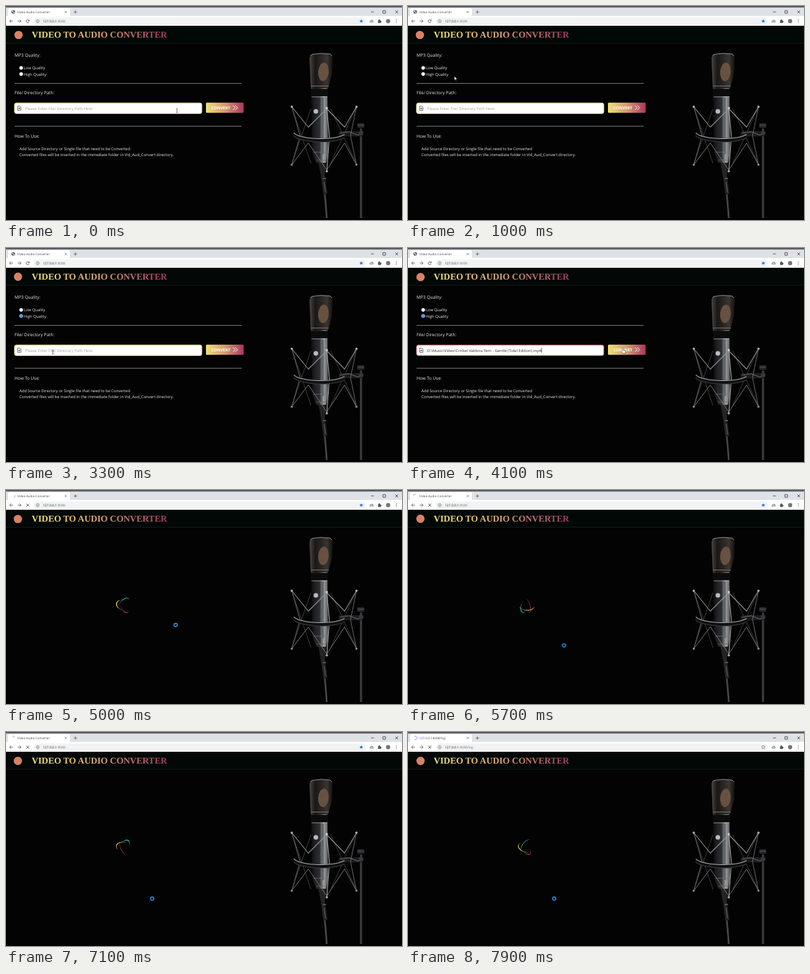
Write an HTML page with a canvas that moves like this. It is 600 px wide and 325 px high and loops after 8 s.

```html
<!DOCTYPE html>
<html lang="en">
<head>
<meta charset="utf-8">
<title>Video-Audio-Converter</title>
<style>
html, body { margin: 0; width: 100%; height: 100%; overflow: hidden; background: #030303; }
canvas { display: block; width: 600px; height: 325px; }
</style>
</head>
<body>
<canvas id="stage"></canvas>
<script>
const W = 600, H = 325, LOOP = 8000;
const LOW_AT = 1500, HIGH_AT = 2500, FOCUS_AT = 3450, PASTE_AT = 3700, SUBMIT_AT = 4450, LOG_AT = 7600;
const SANS = '"Open Sans", "Noto Sans", sans-serif';
const PATH = 'D:\\Music\\Video\\Crickel Valdora Tern - Gentle (Tidal Edition).mp4';

const canvas = document.getElementById('stage');
const dpr = window.devicePixelRatio || 1;
canvas.width = W * dpr;
canvas.height = H * dpr;
const c = canvas.getContext('2d');

// Pointer stops: time, x, y
const route = [
  [0, 259, 159], [250, 259, 159], [1300, 24, 94], [1550, 24, 94], [1900, 54, 117],
  [2350, 24, 103], [2600, 24, 103], [3250, 71, 158], [3650, 72, 158], [4050, 326, 155],
  [4500, 326, 155], [5000, 257, 205], [5400, 240, 231], [6300, 226.5, 250.5],
  [6400, 226, 251], [7000, 221.5, 253], [8000, 221.5, 253]
];

function pointer(t) {
  let i = 1;
  while (route[i][0] < t) i++;
  const [t0, x0, y0] = route[i - 1], [t1, x1, y1] = route[i];
  const u = (t - t0) / (t1 - t0), e = u * u * (3 - 2 * u);
  return [x0 + (x1 - x0) * e, y0 + (y1 - y0) * e];
}

function rect(x, y, w, h, fill) {
  c.fillStyle = fill;
  c.fillRect(x, y, w, h);
}

function round(x, y, w, h, r, fill, stroke, lw = 1) {
  c.beginPath();
  c.roundRect(x, y, w, h, r);
  if (fill) { c.fillStyle = fill; c.fill(); }
  if (stroke) { c.strokeStyle = stroke; c.lineWidth = lw; c.stroke(); }
}

function trace(pts, close) {
  c.beginPath();
  for (let i = 0; i < pts.length; i += 2) c.lineTo(pts[i], pts[i + 1]);
  if (close) c.closePath();
}

function line(color, lw, ...pts) {
  trace(pts);
  c.strokeStyle = color;
  c.lineWidth = lw;
  c.stroke();
}

function poly(fill, ...pts) {
  trace(pts, true);
  c.fillStyle = fill;
  c.fill();
}

function disc(x, y, r, fill) {
  c.beginPath();
  c.arc(x, y, r, 0, 7);
  c.fillStyle = fill;
  c.fill();
}

function arc(x, y, r, a, b, color, lw) {
  c.beginPath();
  c.arc(x, y, r, a, b);
  c.strokeStyle = color;
  c.lineWidth = lw;
  c.stroke();
}

function text(str, x, y, size, fill, weight = 400, family = SANS) {
  c.font = `${weight} ${size}px ${family}`;
  c.fillStyle = fill;
  c.fillText(str, x, y);
  return x + c.measureText(str).width;
}

function blend(x0, x1, ...colors) {
  const g = c.createLinearGradient(x0, 0, x1, 0);
  colors.forEach((k, i) => g.addColorStop(i / (colors.length - 1), k));
  return g;
}

function star(x, y, r, filled) {
  const pts = [];
  for (let i = 0; i < 10; i++) {
    const a = i * Math.PI / 5 - Math.PI / 2, q = i % 2 ? r * 0.45 : r;
    pts.push(x + q * Math.cos(a), y + q * Math.sin(a));
  }
  trace(pts, true);
  if (filled) { c.fillStyle = '#1a73e8'; c.fill(); }
  else { c.strokeStyle = '#5f6368'; c.lineWidth = 0.6; c.stroke(); }
}

function cross(x, y, r, color, lw) {
  line(color, lw, x - r, y - r, x + r, y + r);
  line(color, lw, x - r, y + r, x + r, y - r);
}

function arrow(x, y, dir, color) {
  line(color, 0.8, x - 2.6 * dir, y, x + 2.6 * dir, y);
  line(color, 0.8, x, y - 2.5, x + 2.6 * dir, y, x, y + 2.5);
}

function browser(t) {
  const loading = t >= SUBMIT_AT, log = t >= LOG_AT;
  rect(0, 0, W, 15, '#dee1e6');
  rect(0, 0, W, 2.3, '#575a60');
  round(3, 3, 94, 14, [3, 3, 0, 0], '#fff');
  rect(0, 15, W, 15, '#fff');

  if (loading) {
    const a = log ? t / 130 : -t / 260;
    arc(11, 9, 2.6, a, a + (log ? 4 : 1.7), log ? '#3f86e8' : '#8a9096', 0.8);
  } else {
    disc(11, 9, 2.8, '#5f6368');
    poly('#dfe1e4', 9, 8, 10.5, 7, 11.4, 8.2, 10.2, 9.6);
    poly('#dfe1e4', 11.4, 9.2, 13, 9, 12.4, 10.6, 11, 11.2);
  }
  text(log ? '127.0.0.1:8088/log' : 'Video-Audio-Converter', 17, 10.8, 4.65, '#45494d');
  cross(90.5, 9.2, 1.5, '#50555a', 0.7);
  line('#50555a', 0.8, 102.8, 9.2, 107.6, 9.2);
  line('#50555a', 0.8, 105.2, 6.8, 105.2, 11.6);
  line('#222', 0.7, 553, 9, 557.5, 9);
  round(571, 7, 4, 4, 0, null, '#222', 0.7);
  cross(592, 9, 2.1, '#222', 0.7);

  arrow(8, 23, -1, '#50555a');
  arrow(20.3, 23, 1, '#50555a');
  if (loading) cross(33, 23, 2.2, '#50555a', 0.9);
  else {
    arc(33, 23, 2.3, 0.5, 5.6, '#50555a', 0.9);
    poly('#50555a', 35.7, 20.2, 35.7, 22.8, 33.2, 22.8);
  }
  round(42, 17.6, 503, 11, 5.5, '#f1f3f4');
  arc(48, 23, 2.3, 0, 7, '#5f6368', 0.6);
  rect(47.7, 22.6, 0.7, 1.8, '#5f6368');
  rect(47.7, 21.5, 0.7, 0.7, '#5f6368');
  const x = text('127.0.0.1', 56, 24.9, 5, '#24272a');
  text(log ? ':8088/log' : ':8088', x, 24.9, 5, '#777c81');
  star(538.3, 23, 3, !log);

  arc(554, 24, 2.5, 3, 6.4, '#50555a', 0.8);
  line('#50555a', 0.8, 553.5, 24.2, 555.4, 22);
  line('#50555a', 0.6, 551.4, 24.5, 556.6, 24.5);
  round(563.7, 21.6, 4.2, 4.2, 0.5, '#50555a');
  disc(565.6, 21.3, 1, '#50555a');
  disc(568, 23.7, 1, '#50555a');
  disc(579, 23, 3.2, '#777');
  for (const y of [20.9, 23, 25.1]) disc(591.3, y, 0.6, '#50555a');
}

function header(t) {
  rect(0, 30, W, 26, '#020806');
  rect(0, 56, W, 0.8, '#171c20');
  const a = t * Math.PI / 1000;
  disc(18.5 + 0.5 * Math.cos(a), 44 + 0.5 * Math.sin(a), 6.3, '#d98165');
  text('VIDEO TO AUDIO CONVERTER', 39, 48.2, 13.62, blend(39, 245, '#f3e97c', '#d9a077', '#9c3b60'),
    700, '"Liberation Serif", "Times New Roman", serif');
}

function microphone() {
  // stand
  rect(535.8, 186, 4.2, 136, blend(535.8, 540, '#121212', '#4c4c4c', '#111'));
  round(532, 178, 11, 7, 2, '#25282c');
  line('#555a5f', 1, 533, 181, 542, 181);
  round(504, 190, 36, 8, 3, '#1c1c1e');
  line('#77797c', 0.9, 506, 193, 520, 191, 533, 196, 541, 193);
  disc(538, 193, 3.5, '#36383b');

  // rear struts
  for (const [x0, x1] of [[433, 462], [531, 492]]) {
    line('#3c3c3c', 1, x0, 153, x1, 239);
    line('#3c3c3c', 1, x0, 240, x1, 156);
  }

  // cable
  c.beginPath();
  c.moveTo(478, 234);
  c.bezierCurveTo(478, 255, 483, 275, 486, 322);
  c.strokeStyle = '#303030';
  c.lineWidth = 3;
  c.stroke();
  line('#717171', 0.7, 478, 250, 483, 282, 486, 322);
  poly('#242424', 473, 236, 485, 236, 483, 257, 487, 285, 481, 287, 477, 257);
  line('#8a8a8a', 1, 480, 262, 485, 262);
  line('#777', 0.8, 482, 267, 484, 283);

  // body
  poly(blend(462, 488, '#0b0b0c', '#202124', '#2b2d30', '#9da0a3', '#555'),
    462, 125, 487, 125, 488, 222, 485, 238, 470, 238, 464, 222);
  rect(462, 126, 26, 11, '#0c0c0d');
  line('#a7a7a7', 0.8, 463, 138, 487, 138);
  rect(477, 139, 4.5, 86, '#606367');
  disc(469.5, 160, 3.5, '#b9bbbd');
  line('#757575', 0.8, 466, 222, 487, 222);
  line('#666', 0.8, 470, 234, 485, 234);

  // head
  c.save();
  trace([460, 78, 463, 73, 477, 71.5, 492, 72.5, 495, 77, 494, 102, 488, 125, 462, 126], true);
  c.clip();
  rect(458, 70, 40, 58, blend(460, 495, '#55514e', '#201d1b', '#352e2a', '#45413e', '#171513'));
  c.beginPath();
  c.ellipse(481, 100, 8, 14, 0.08, 0, 7);
  c.fillStyle = '#806450';
  c.fill();
  for (let i = -60; i < 45; i += 2.2) {
    line('rgba(0,0,0,.38)', 0.6, 458 + i, 70, 516 + i, 128);
    line('rgba(0,0,0,.38)', 0.6, 500 - i, 70, 442 - i, 128);
  }
  rect(459, 121, 34, 1, '#77716c');
  c.restore();
  line('#9b9793', 0.9, 461, 76, 464, 73.5, 477, 72, 491, 73, 494, 76);
  line('#54504d', 0.7, 460.5, 78, 462.5, 125);

  // suspension frame
  for (const [x0, x1, x2] of [[433, 458, 486], [531, 513, 486]]) {
    line('#929292', 1.1, x0, 153, x1, 184, x2, 156);
    line('#777', 1, x0, 241, x1, 208, x2, 249);
    line('#6a6a6a', 1, x0, 153, (x0 + x1) / 2, 197, x0, 241);
    disc(x0, 153, 1.7, '#bbb');
    disc(x0, 241, 1.6, '#999');
  }
  line('#a2a2a2', 1.2, 486, 156, 490, 198, 486, 251);
  disc(486, 155, 1.8, '#ccc');
  disc(486, 251, 1.8, '#aaa');

  // ring
  for (const [color, lw, dy] of [['#101011', 6, 0], ['#aeb0b2', 1.1, -2.4], ['#4a4b4d', 0.8, 2.6]]) {
    c.beginPath();
    c.moveTo(436, 195 + dy);
    c.bezierCurveTo(445, 204 + dy, 490, 208 + dy, 513, 198 + dy);
    c.strokeStyle = color;
    c.lineWidth = lw;
    c.stroke();
  }
}

function radio(y, on) {
  disc(23, y, 2.7, '#fff');
  if (!on) return;
  arc(23, y, 2.4, 0, 7, '#1673df', 0.8);
  disc(23, y, 1.45, '#1673df');
}

function form(t) {
  const ink = '#ececec';
  text('MP3 Quality:', 13, 76.9, 6.6, ink);
  radio(94, t >= LOW_AT && t < HIGH_AT);
  radio(103.2, t >= HIGH_AT);
  text('Low Quality', 27, 96.2, 5.93, ink);
  text('High Quality', 27, 105.5, 5.93, ink);
  rect(13, 117, 344, 0.9, '#858585');
  text('File/ Directory Path:', 13, 134.4, 6.6, ink);

  const focused = t >= FOCUS_AT;
  round(12.8, 147.2, 284, 16.2, 3, '#fff', focused ? '#b8434b' : '#e2d568', 0.9);
  line('#333', 0.7, 17.7, 152, 20.8, 152, 22.7, 154, 22.7, 158.4, 17.7, 158.4, 17.7, 152);
  line('#333', 0.7, 18.8, 155.6, 21.6, 155.6);
  line('#333', 0.7, 20.2, 154.2, 20.2, 157);
  if (t >= PASTE_AT) {
    const end = text(PATH, 29, 157.7, 5.87, '#333');
    rect(end + 0.3, 151.6, 0.6, 7.4, '#111');
  } else {
    text('Please Enter File/ Directory Path Here', 29, 157.7, 5.87, '#a0a0a0');
    if (focused) rect(28.6, 151.6, 0.6, 7.4, '#111');
  }

  round(303, 146.8, 57, 15.4, 1.5, blend(303, 360, '#eee076', '#d69a70', '#a9375f'));
  text('CONVERT', 311, 156.8, 6.2, '#fff', 700);
  for (const x of [344, 347.6]) line('#fff', 1, x, 151.2, x + 3.3, 154.5, x, 157.8);

  rect(13, 182.2, 344, 0.9, '#858585');
  text('How To Use:', 13, 199.9, 6.6, ink);
  text('Add Source Directory or Single file that need to be Converted', 20.3, 219.1, 5.93, ink);
  text('Converted files will be inserted in the immediate folder in Vid_Aud_Convert directory.',
    20.3, 228.4, 5.93, ink);
}

// Three tilted crescents spinning once per second
function loader(t) {
  const turn = Math.PI + t * Math.PI / 500, r = 12.5, deg = Math.PI / 180;
  const rings = [[35, -45, 0, '#36b3bd'], [50, 10, -90, '#e6cf5c'], [35, 55, 180, '#bf3550']];
  for (const [ax, ay, start, color] of rings) {
    const a = ax * deg, b = ay * deg;
    c.save();
    c.translate(179, 175);
    c.transform(Math.cos(b), Math.sin(a) * Math.sin(b), 0, Math.cos(a), 0, 0);
    c.rotate(turn + start * deg);
    c.beginPath();
    c.arc(0, 0, r, 0, Math.PI);
    c.ellipse(0, 0, r, r - 1.4, 0, Math.PI, 0, true);
    c.fillStyle = color;
    c.fill();
    c.restore();
  }
}

function cursor(t) {
  const [x, y] = pointer(t);
  if (t >= SUBMIT_AT) {
    arc(x, y, 2.5, 0, 7, '#2f9bf0', 1.3);
    return;
  }
  const inRow = y > 147 && y < 163;
  c.save();
  c.translate(x, y);
  if (inRow && x > 13 && x < 297) {
    line('#333', 0.7, 0, -2.8, 0, 2.8);
    line('#333', 0.6, -1.2, -3, 1.2, -3);
    line('#333', 0.6, -1.2, 3, 1.2, 3);
  } else if (inRow && x > 303 && x < 360) {
    round(-1.1, -2.4, 1.5, 5.5, 0.7, '#fff', '#222', 0.5);
    round(-2, 0.4, 5.4, 4.4, 1.2, '#fff', '#222', 0.5);
    rect(-0.8, -1.6, 0.9, 4, '#fff');
  } else {
    poly('#fff', 0, 0, 0, 5.6, 1.3, 4.5, 2.2, 6.3, 3, 5.9, 2.2, 4.2, 3.9, 4);
    c.strokeStyle = '#222';
    c.lineWidth = 0.4;
    c.stroke();
  }
  c.restore();
}

function draw(t) {
  c.setTransform(dpr, 0, 0, dpr, 0, 0);
  c.textRendering = 'geometricPrecision';
  c.lineJoin = 'round';
  rect(0, 0, W, H, '#030303');
  browser(t);
  header(t);
  microphone();
  if (t < SUBMIT_AT) form(t);
  else loader(t);
  cursor(t);
}

const begin = performance.now();
function tick() {
  draw((performance.now() - begin) % LOOP);
  requestAnimationFrame(tick);
}
tick();
</script>
</body>
</html>
```
